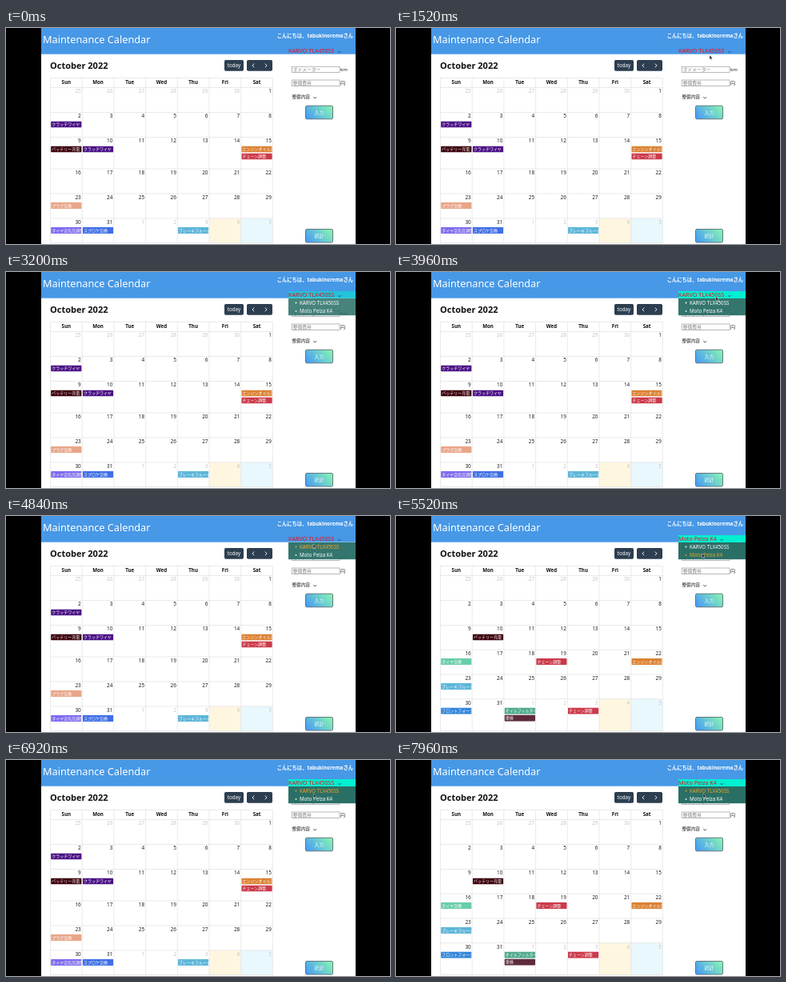
Animation of 480 by 270 pixels, one loop 8 s. Source, as an HTML page:

```html
<!DOCTYPE html>
<html lang="ja">
<head>
<meta charset="utf-8">
<title>Maintenance Calendar</title>
<style>
  html, body { margin: 0; width: 100%; height: 100%; overflow: hidden; background: #000; }
  svg { display: block; width: 100vw; height: 100vh; }
  text { font-family: "Noto Sans", "Noto Sans CJK JP", "Noto Sans CJK", sans-serif; white-space: pre; }
</style>
</head>
<body>
<svg id="stage" viewBox="0 0 480 270">
  <defs>
    <linearGradient id="shine" x1="0" y1="0.7" x2="1" y2="0.3">
      <stop offset="0" stop-color="#4b9ff2"/>
      <stop offset="1" stop-color="#84f0b4"/>
    </linearGradient>
  </defs>
</svg>
<script>
const LOOP = 8000;
const stage = document.getElementById('stage');
const BIKES = ['KARVO TLX450SS', 'Moto Pelza K4'];
const COLUMN = 39.7, LEFT = 55.5, RIGHT = LEFT + 7 * COLUMN;

function add(parent, tag, attrs = {}, content) {
  const node = document.createElementNS(stage.namespaceURI, tag);
  for (const key in attrs) node.setAttribute(key, attrs[key]);
  if (content !== undefined) node.textContent = content;
  parent.append(node);
  return node;
}
const rect = (parent, x, y, width, height, fill, more) =>
  add(parent, 'rect', { x, y, width, height, fill, ...more });
const label = (parent, x, y, size, fill, content, more) =>
  add(parent, 'text', { x, y, 'font-size': size, fill, ...more }, content);
const stroke = (parent, d, color, width = 0.6) =>
  add(parent, 'path', { d, fill: 'none', stroke: color, 'stroke-width': width });
const middle = { 'text-anchor': 'middle' };
const end = { 'text-anchor': 'end' };

// Page and header
rect(stage, 44, 0, 393, 270, '#fff');
rect(stage, 44, 0, 393, 32.7, '#4798e6');
label(stage, 46, 19, 12.7, '#fff', 'Maintenance Calendar', { 'font-weight': 500 });
label(stage, 434, 12, 6.3, '#fff', 'こんにちは、tabukinoremaさん', { ...end, 'font-weight': 600 });

// Toolbar
label(stage, 55, 51, 11, '#111', 'October 2022', { 'font-weight': 600 });
rect(stage, 273, 40, 24, 13.7, '#2c3e50', { rx: 1.8 });
label(stage, 285, 49, 6.2, '#fff', 'today', middle);
rect(stage, 301, 40, 32, 13.7, '#2c3e50', { rx: 1.8 });
stroke(stage, 'M310.2 44.6l-2.2 2.3 2.2 2.3M323.8 44.6l2.2 2.3-2.2 2.3', '#fff', 0.9);

// Calendar: each event is [row, column, slot, text, color]
const CLUTCH = ['クラッチワイヤ', '#4b1286'];
const BATTERY = ['バッテリー充電', '#3d000c'];
const OIL = ['エンジンオイル交換', '#db8234'];
const CHAIN = ['チェーン調整', '#cb3a4b'];
const BRAKE = ['ブレーキフルード', '#5db6d9'];
const calendars = [
  drawCalendar([74.5, 105.5, 136.5, 176, 207, 238, 268.5], [
    [1, 0, 0, ...CLUTCH],
    [2, 0, 0, ...BATTERY],
    [2, 1, 0, ...CLUTCH],
    [2, 6, 0, ...OIL],
    [2, 6, 1, ...CHAIN],
    [4, 0, 0, 'プラグ交換', '#e9a588'],
    [5, 0, 0, 'タイヤ空気圧調整', '#7d6bee'],
    [5, 1, 0, 'スプロケ交換', '#3f6fe6'],
    [5, 4, 0, ...BRAKE]
  ]),
  drawCalendar([74.5, 105.5, 136.5, 167.2, 198, 228.7, 268.5], [
    [2, 1, 0, ...BATTERY],
    [3, 0, 0, 'タイヤ交換', '#69cda8'],
    [3, 3, 0, ...CHAIN],
    [3, 6, 0, ...OIL],
    [4, 0, 0, ...BRAKE],
    [5, 0, 0, 'フロントフォーク', '#3586da'],
    [5, 2, 0, 'オイルフィルター', '#50aa8e'],
    [5, 2, 1, '車検', '#5e2b3c'],
    [5, 4, 0, ...CHAIN]
  ])
];

function drawCalendar(rows, events) {
  const group = add(stage, 'g');
  const columnX = i => LEFT + i * COLUMN;
  rect(group, columnX(5), rows[5], COLUMN, rows[6] - rows[5], '#fef6df');
  rect(group, columnX(6), rows[5], COLUMN, rows[6] - rows[5], '#e8f8fc');
  let grid = '';
  for (const y of [62.5, ...rows]) grid += `M${LEFT} ${y}H${RIGHT}`;
  for (let i = 0; i < 8; i++) grid += `M${columnX(i)} 62.5V${rows[6]}`;
  stroke(group, grid, '#dcdcdc');

  ['Sun', 'Mon', 'Tue', 'Wed', 'Thu', 'Fri', 'Sat'].forEach((day, i) =>
    label(group, columnX(i + 0.5), 70.4, 6.2, '#111', day, { ...middle, 'font-weight': 600 }));

  for (let i = 0; i < 42; i++) {
    const date = i < 6 ? 25 + i : i < 37 ? i - 5 : i - 36;
    const color = i < 6 || i > 36 ? '#c6c6c6' : '#222';
    label(group, columnX(i % 7 + 1) - 1.5, rows[Math.floor(i / 7)] + 6.9, 6.4, color, date, end);
  }

  for (const [row, column, slot, title, color] of events) {
    const box = add(group, 'svg', {
      x: columnX(column) + 0.6, y: rows[row] + 10.9 + slot * 9,
      width: COLUMN - 1.2, height: 8.2, overflow: 'hidden'
    });
    rect(box, 0, 0, COLUMN - 1.2, 8.2, color, { rx: 1 });
    label(box, 1.2, 5.9, 5, '#fff', title, { 'font-weight': 500 });
  }
  return group;
}

// Entry form
function field(y, hint, unit) {
  rect(stage, 357.5, y, 59.5, 7.4, '#fff', { stroke: '#8a8a8a', 'stroke-width': 0.6 });
  label(stage, 358.7, y + 5.8, 5.8, '#858585', hint);
  label(stage, 418, y + 5.8, 6, '#222', unit);
}
function button(y, title) {
  rect(stage, 374.5, y, 34, 16.6, 'url(#shine)', { rx: 1.6, stroke: '#4d5b66', 'stroke-width': 0.8 });
  label(stage, 391.5, y + 10.4, 6, '#e9f8ff', title, middle);
}
field(48.2, 'オドメーター', 'km');
field(65, '整備費用', '円');
label(stage, 357.5, 88, 5.6, '#222', '整備内容');
stroke(stage, 'M384.3 86.2l1.9 1.9 1.9-1.9', '#222', 0.8);
button(97.2, '入力');
button(251.5, '統計');

// Bike selector
const bar = rect(stage, 353, 24, 84, 9, '#00f0d0');
const menu = add(stage, 'g');
rect(menu, 353, 33, 84, 21.2, '#2a6f66');
const items = BIKES.map((name, i) => {
  const item = add(menu, 'g');
  const y = 40.7 + i * 10.4;
  add(item, 'circle', { cx: 362.5, cy: y - 2.2, r: 0.9 });
  label(item, 367, y, 6.2, 'inherit', name);
  item.querySelector('text').removeAttribute('fill');
  return item;
});
const selected = BIKES.map(name => {
  const group = add(stage, 'g');
  const title = label(group, 353, 31.4, 7.2, '#e8101c', name, { 'font-weight': 500 });
  const x = 353 + title.getComputedTextLength() + 4.5;
  stroke(group, `M${x} 29l2 2 2-2`, '#244a70', 0.8);
  return group;
});

const cursor = add(stage, 'path', {
  d: 'M0 0V5.2L1.2 4.1 2.1 6.1 3 5.7 2.1 3.8H3.7Z',
  fill: '#111', stroke: '#fff', 'stroke-width': 0.4
});

// Tracks are rows of [time, ...values]
const POINTER = [
  [1200, 400, 46], [1480, 392, 34], [1900, 392, 34], [2500, 408, 31], [2960, 422, 29],
  [3500, 422, 29], [4000, 398, 31], [4600, 385, 35], [4880, 384, 35], [5240, 382.5, 47],
  [5900, 382.5, 47], [6400, 384.5, 42], [6960, 384.5, 42], [7240, 383, 47.5],
  [7500, 383, 47.5], [7840, 384, 42], [8000, 384, 42]
];
const BAR = [[3040, 0], [3360, 1], [4300, 1], [4600, 0], [4880, 0], [5160, 1]];
const MENU = [[3040, 0], [3200, 0.86], [3440, 0.95], [4840, 0.95], [5160, 1]];
const SWITCHES = [5320, 6640, 7400];

function sample(track, t) {
  const next = track.findIndex(row => row[0] > t);
  if (next === 0) return track[0].slice(1);
  if (next < 0) return track[track.length - 1].slice(1);
  const a = track[next - 1], b = track[next];
  const p = (t - a[0]) / (b[0] - a[0]);
  return a.slice(1).map((value, i) => value + (b[i + 1] - value) * p);
}
const show = (node, on) => node.setAttribute('visibility', on ? 'visible' : 'hidden');

function render(now) {
  const t = now % LOOP;
  const bike = SWITCHES.filter(time => t >= time).length % 2;
  const [x, y] = sample(POINTER, t);
  const hovered = t < 3040 || y < 33 ? -1 : y < 43.5 ? 0 : 1;

  calendars.forEach((group, i) => show(group, i === bike));
  selected.forEach((group, i) => show(group, i === bike));
  items.forEach((item, i) => item.setAttribute('fill', i === hovered ? '#f0a028' : '#fff'));
  bar.setAttribute('opacity', sample(BAR, t)[0]);
  menu.setAttribute('opacity', sample(MENU, t)[0]);
  cursor.setAttribute('transform', `translate(${x} ${y})`);
  show(cursor, t >= 1280 && (t < 2960 || t >= 3500));
  requestAnimationFrame(() => render(performance.now()));
}
render(performance.now());
</script>
</body>
</html>
```
